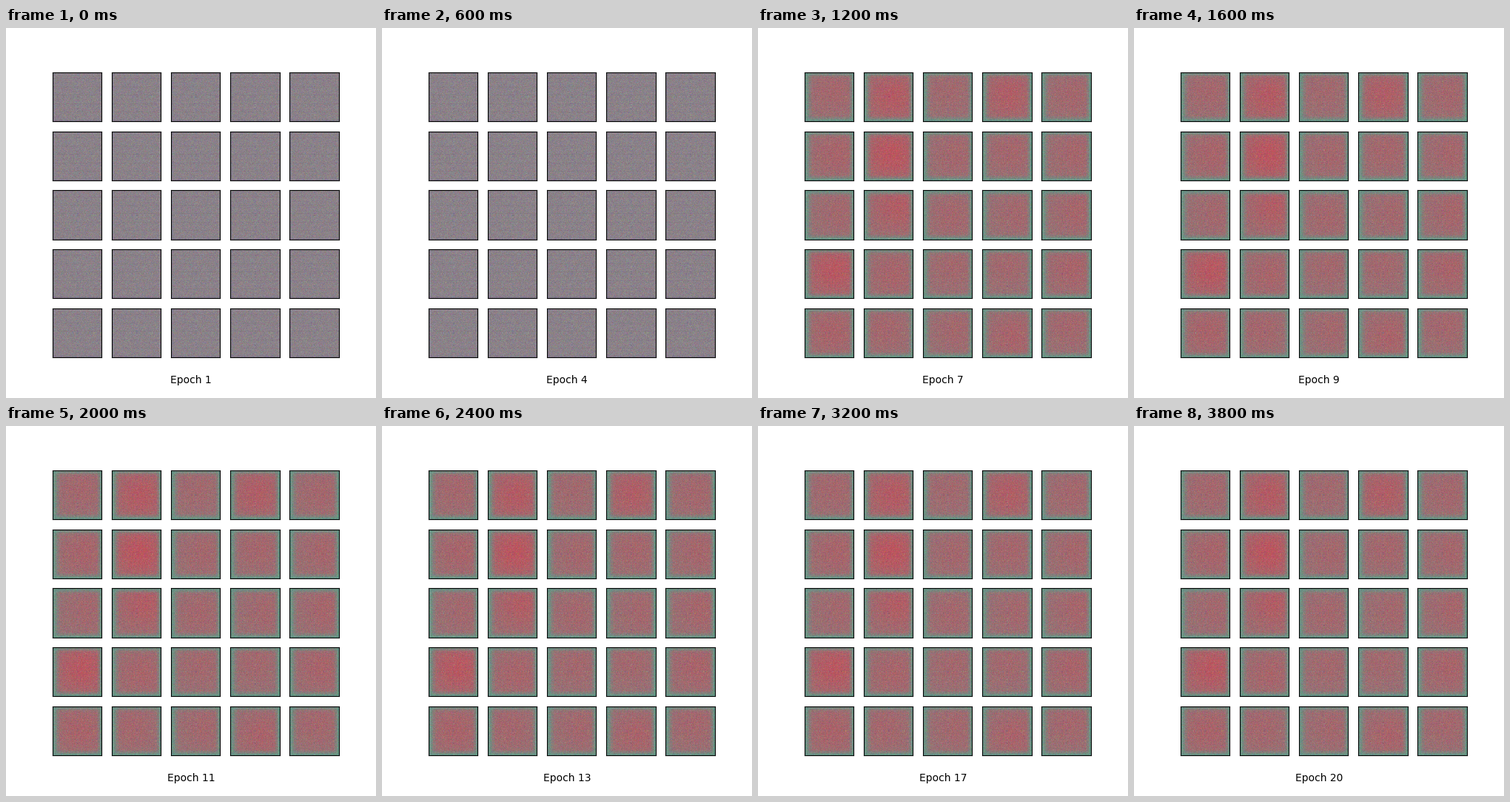
These frames come from a looping animation (500x500 px, 4 s). A matplotlib script:

```python
import numpy as np
import matplotlib.pyplot as plt
from matplotlib.animation import FuncAnimation

EPOCHS = 20
GRID = 5
SIZE = 66
WARM_UP = 4  # epochs of plain noise before colour appears

GREY = np.array([139, 130, 137])
TEAL = np.array([103, 150, 134])
MID = np.array([141, 121, 123])
RED = np.array([190, 84, 94])

# Samples that glow more than the rest
HOT = {1: .8, 3: .72, 6: .95, 11: .74, 15: .88}

rng = np.random.default_rng(7)
yy, xx = np.mgrid[:SIZE, :SIZE]


def smooth(d, width):
    t = np.clip(d / width, 0, 1)
    return t * t * (3 - 2 * t)


def blend(a, b, amount):
    return a + (b - a) * amount[..., None]


def tint(mask, *colour):
    return mask[..., None] * np.array(colour)


def to_rgb(values):
    return np.clip(values, 0, 255).astype(np.uint8)


inside = (smooth(xx + 1, 13) * smooth(yy + 1, 10)
          * smooth(SIZE - xx, 9) * smooth(SIZE - yy, 9))
rim = 1 - smooth(xx + 2, 7) * smooth(SIZE - yy + 1, 6)

# Checkerboard left by strided upsampling, the same in every sample
dots = (xx % 2) * (yy % 2) - .25
lines = ((xx % 4 == 0) | (yy % 4 == 0)) - .4375
lattice = tint(dots, -20, 14, 10) + tint(lines, -10, 4, 2)

stripes = (yy % 11 == 9) * (xx % 2)
speckle = rng.normal(0, 5, (SIZE, SIZE, 3))
grain = rng.normal(0, 1, (GRID * GRID, SIZE, SIZE, 3))


def noise_tile(k):
    return GREY + tint(rim, -6, -3, 6) - tint(stripes, 10, 10, 8) + speckle + 6 * grain[k]


def glow_tile(k):
    strength = HOT.get(k, rng.uniform(.44, .62))
    cx, cy = rng.normal((39, 30), 4)
    blob = np.exp(-((xx - cx) ** 2 + (yy - cy) ** 2) / (2 * 23 ** 2))
    base = blend(TEAL, MID, inside)
    red = strength * inside * (.3 + .7 * blob)
    return blend(base, RED, red) + lattice + speckle + 5 * grain[k]


noise = [noise_tile(k) for k in range(GRID * GRID)]
glow = [glow_tile(k) for k in range(GRID * GRID)]


def sample(k, epoch):
    if epoch < WARM_UP:
        return to_rgb(noise[k])
    flicker = np.random.default_rng([epoch, k])
    if epoch == WARM_UP:
        return to_rgb(noise[k] + flicker.normal(0, 2, noise[k].shape))
    spots = flicker.random((SIZE, SIZE)) < .15
    return to_rgb(glow[k] + tint(spots * inside, 1, 1, 1) * flicker.normal(0, 7, glow[k].shape))


fig, axes = plt.subplots(GRID, GRID, figsize=(5, 5), dpi=100)
images = []
for k, ax in enumerate(axes.flat):
    ax.set_xticks([])
    ax.set_yticks([])
    images.append(ax.imshow(sample(k, 1), interpolation="nearest"))
label = fig.text(0.5, 0.04, "Epoch 1", ha="center")


def update(i):
    epoch = i + 1
    for k, image in enumerate(images):
        image.set_data(sample(k, epoch))
    label.set_text(f"Epoch {epoch}")
    return images + [label]


anim = FuncAnimation(fig, update, frames=EPOCHS, interval=200, repeat=True)
plt.show()
```
